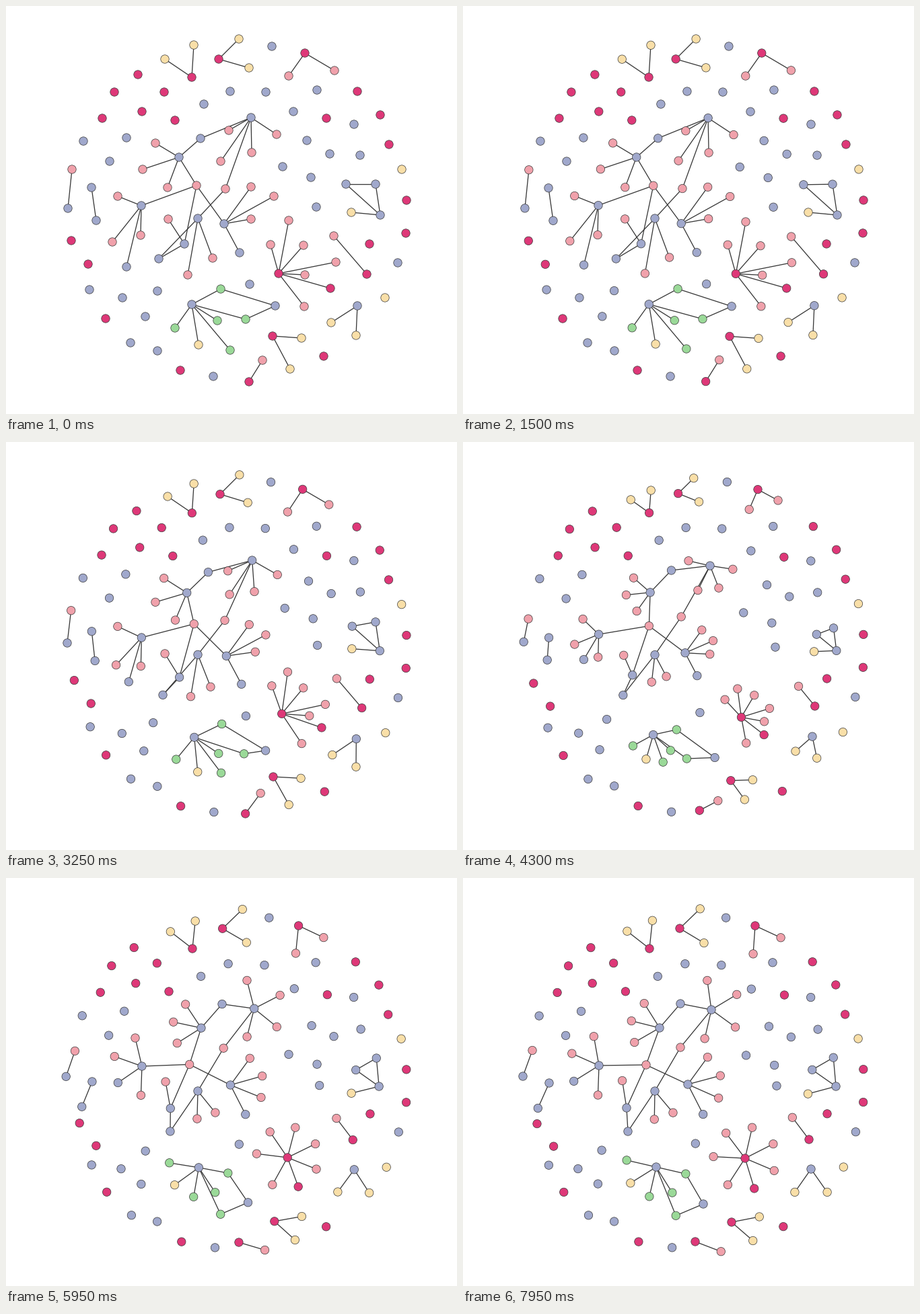
Write a matplotlib script that moves like this. It is 670 px wide and 607 px high and loops after 8000 ms.

```python
import numpy as np
import matplotlib.pyplot as plt
from matplotlib.animation import FuncAnimation
from matplotlib.collections import LineCollection

W, H, DPI = 670, 607, 100
STEP, FRAMES = 50, 160
PX = 72 / DPI
MIDDLE = np.array([342, 305])

MAGENTA, PINK, BLUE = "#de3878", "#f0a1ab", "#a0a8cc"
YELLOW, GREEN = "#f9dfa8", "#9ad998"

clock = np.arange(FRAMES) * STEP


def smooth(begin, finish):
    u = np.clip((clock - begin) / (finish - begin), 0, 1)
    return u * u * (3 - 2 * u)


drift = smooth(1000, 6800)     # hubs and loose nodes
pull = smooth(800, 6000)       # links settle to their rest length
turn = smooth(2700, 6500)      # leaves spread around their hub
squeeze = 1 - 0.24 * np.exp(-((clock - 4500) / 900) ** 2)

# Local pushes on loose nodes: center, shift, reach
PUSHES = [((435, 235), (12, 29), 75), ((290, 410), (-42, -42), 80),
          ((110, 365), (16, 16), 40), ((230, 150), (-10, -4), 50)]

paths, colors, links = [], [], []


def add(color, path):
    paths.append(path)
    colors.append(color)
    return len(paths) - 1


def node(color, start, end):
    start, end = np.array(start), np.array(end)
    return add(color, start + drift[:, None] * (end - start))


def loose(color, *spots):
    """Free nodes: a slight turn of the whole disc plus the local pushes."""
    for spot in np.array(spots, float):
        dx, dy = spot - MIDDLE
        end = spot + 0.018 * np.array([dy, -dx])
        for center, shift, reach in PUSHES:
            gap = np.hypot(*(spot - center)) / reach
            end += np.array(shift) * np.exp(-gap**2)
        node(color, spot, end)


def link(hub, *others):
    links.extend((hub, other) for other in others)


def fan(hub, first, step, *leaves, rest=None):
    """Leaves swing about their hub until they are evenly spread."""
    rest = rest or 40 + len(leaves)
    made = []
    for k, (color, x, y) in enumerate(leaves):
        dx, dy = np.array([x, y]) - paths[hub][0]
        angle, reach = np.degrees(np.arctan2(dy, dx)), np.hypot(dx, dy)
        swing = (first + k * step - angle + 180) % 360 - 180
        a = np.radians(angle + swing * turn)
        r = (reach + (rest - reach) * pull) * squeeze / squeeze[0]
        made.append(add(color, paths[hub] + np.column_stack([r * np.cos(a), r * np.sin(a)])))
    link(hub, *made)
    return made


loose(MAGENTA, (196, 102), (161, 128), (235, 128), (143, 167), (202, 157), (251, 170),
      (522, 127), (476, 167), (556, 162), (569, 206), (595, 289), (594, 338),
      (540, 354), (97, 349), (122, 384), (148, 465), (259, 542), (472, 521))
loose(YELLOW, (588, 243), (563, 434))
loose(BLUE, (395, 60), (333, 127), (386, 128), (462, 125), (294, 146), (427, 157),
      (517, 176), (447, 200), (481, 220), (526, 222), (411, 239), (453, 255),
      (461, 299), (582, 382), (115, 201), (179, 196), (154, 231), (124, 422),
      (173, 434), (225, 424), (207, 462), (185, 501), (225, 513), (308, 551),
      (362, 414))

# Pairs and forks
fan(node(MAGENTA, (276, 106), (277, 105)), 218, 58, (YELLOW, 236, 79), (YELLOW, 279, 58))
fan(node(MAGENTA, (316, 79), (322, 75)), 316, 75, (YELLOW, 346, 49), (YELLOW, 361, 92))
fan(node(MAGENTA, (444, 70), (434, 71)), 94, -69, (PINK, 420, 104), (PINK, 488, 96))
fan(node(BLUE, (522, 446), (517, 433)), 125, -70, (YELLOW, 483, 471), (YELLOW, 520, 490))
fan(node(MAGENTA, (396, 491), (399, 512)), 349, 52, (YELLOW, 439, 494), (YELLOW, 422, 540))
fan(node(BLUE, (92, 301), (89, 295)), 290, 0, (PINK, 98, 243))
fan(node(BLUE, (127, 270), (128, 305)), 114, 0, (BLUE, 134, 319))
fan(node(MAGENTA, (536, 399), (514, 389)), 233, 0, (PINK, 487, 342))
fan(node(MAGENTA, (361, 559), (345, 541)), 21, 0, (PINK, 381, 527))

# Triangle with a tail
corner = node(BLUE, (556, 311), (554, 310))
tail, left, right = fan(corner, 165, 50, (YELLOW, 513, 307), (BLUE, 505, 265), (BLUE, 549, 265))
link(left, right)

# Magenta star
fan(node(MAGENTA, (405, 398), (419, 417)), 183, 50,
    (PINK, 393, 355), (PINK, 420, 319), (PINK, 442, 356), (PINK, 490, 381),
    (PINK, 444, 400), (MAGENTA, 482, 420), (PINK, 443, 447))

# Green cluster, closed into a ring by a blue node
hub = node(BLUE, (276, 444), (287, 430))
upper = fan(hub, 13, 45, (GREEN, 319, 421), (GREEN, 314, 468), (GREEN, 333, 512),
            (YELLOW, 286, 504), (GREEN, 251, 479))[0]
lower = fan(hub, 68, 0, (GREEN, 356, 466), rest=78)[0]
link(node(BLUE, (400, 446), (357, 485)), upper, lower)

# Central tree: shared joints, then each hub with its leaves
joint = node(BLUE, (289, 197), (323, 187))
bridge = node(PINK, (326, 272), (323, 252))
center = node(PINK, (283, 267), (272, 278))
foot = node(BLUE, (227, 376), (245, 377))

hub = node(BLUE, (364, 166), (369, 196))
link(hub, joint, bridge)
fan(hub, 262, 67, (PINK, 331, 185), (PINK, 402, 191), (PINK, 365, 218), (PINK, 319, 231))

hub = node(BLUE, (257, 225), (292, 223))
link(hub, joint, center)
fan(hub, 238, -44, (PINK, 222, 204), (PINK, 203, 243), (PINK, 240, 270))

hub = node(BLUE, (201, 297), (202, 279))
link(hub, center)
fan(hub, 260, -56, (PINK, 166, 283), (PINK, 158, 351), (BLUE, 179, 388), (PINK, 200, 341))

hub = node(BLUE, (285, 316), (285, 317))
link(hub, bridge, foot)
fan(hub, 50, 41, (PINK, 307, 375), (PINK, 270, 400))

hub = node(BLUE, (265, 354), (243, 342))
link(hub, center, foot)
fan(hub, 261, 0, (PINK, 241, 317))

hub = node(BLUE, (324, 324), (334, 307))
link(hub, center)
fan(hub, 306, 39, (PINK, 364, 269), (PINK, 398, 283), (PINK, 364, 317), (BLUE, 347, 367), rest=50)

track = np.stack(paths, axis=1)
ends = np.array(links)

fig = plt.figure(figsize=(W / DPI, H / DPI), dpi=DPI, facecolor="white")
ax = fig.add_axes([0, 0, 1, 1])
ax.set(xlim=(0, W), ylim=(H, 0))
ax.axis("off")

lines = LineCollection(track[0][ends], colors="#383838", linewidths=1.3 * PX, zorder=1)
ax.add_collection(lines)
dots = ax.scatter(*track[0].T, s=(12.4 * PX) ** 2, c=colors,
                  edgecolors="#383838", linewidths=0.7 * PX, zorder=2)


def draw(i):
    lines.set_segments(track[i][ends])
    dots.set_offsets(track[i])
    return lines, dots


anim = FuncAnimation(fig, draw, frames=FRAMES, interval=STEP, repeat=True, repeat_delay=0)
plt.show()
```
